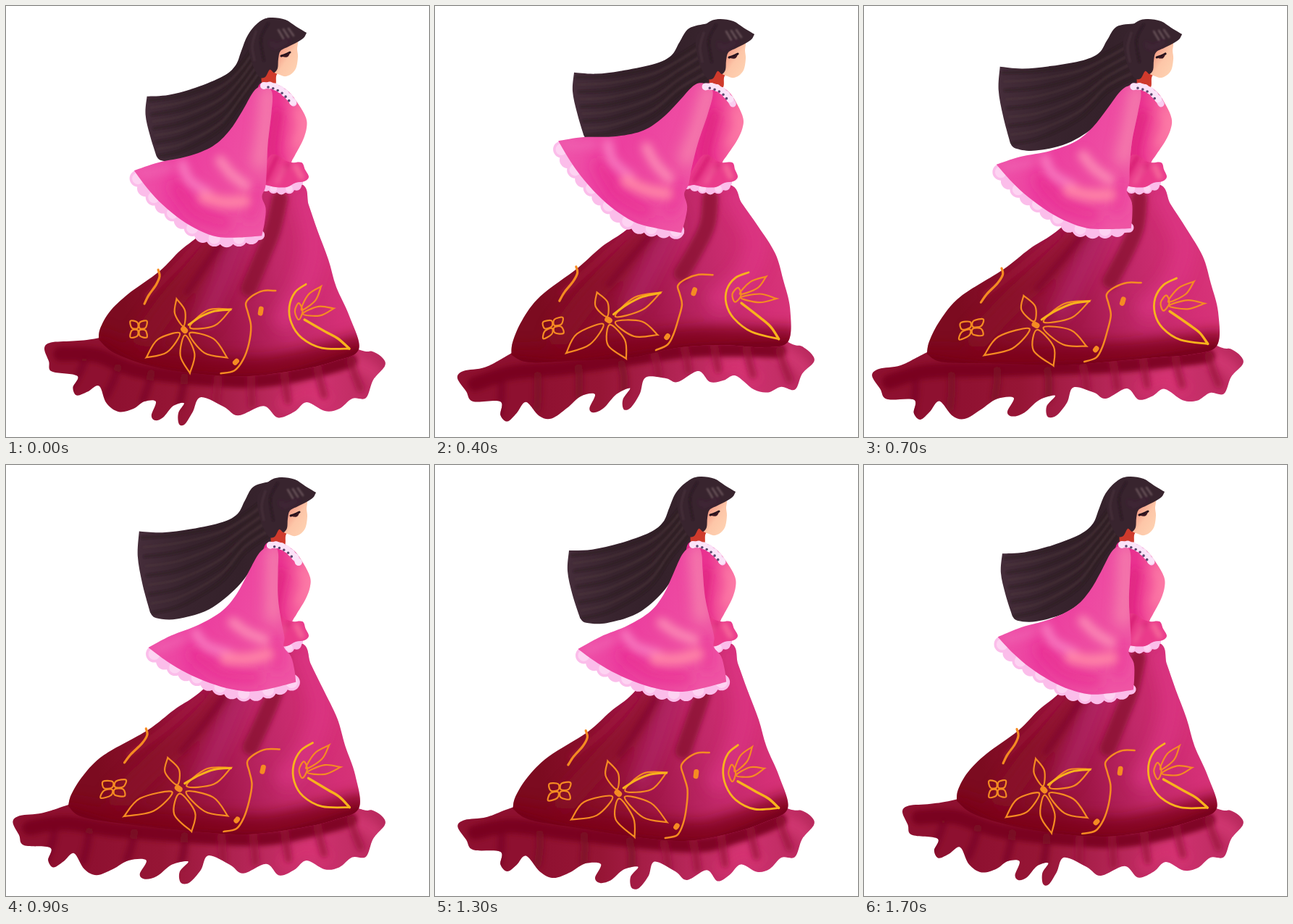
An HTML page for the animation above (1800 ms loop, 584 by 595 pixels).

```html
<!DOCTYPE html>
<html lang="en">
<head>
<meta charset="utf-8">
<title>Windswept dress</title>
<style>
html, body { margin: 0; width: 100%; height: 100%; overflow: hidden; background: #fff; }
svg { display: block; width: 584px; height: 595px; }
</style>
</head>
<body>
<svg id="stage" viewBox="0 0 584 595" xmlns="http://www.w3.org/2000/svg"></svg>
<script>
const LOOP = 1800, STEP = 100;
const unit = v => Math.max(0, Math.min(1, v));
const ease = v => (v = unit(v), v * v * (3 - 2 * v));

// Eases up from a to b and down from c to d, wrapping round the loop
function pulse(t, a, b, c, d) {
  const at = x => ease((x - a) / (b - a)) - ease((x - c) / (d - c));
  return at(t) + at(t + LOOP);
}
const windAt = t => ({
  sway: pulse(t, 0, 400, 600, 1200),
  lift: pulse(t, 0, 400, 450, 950),
  blow: pulse(t, 50, 500, 700, 1250),
  trail: pulse(t, 0, 800, 900, 1700),
  swing: pulse(t, 480, 950, 1520, 1840),
  settle: pulse(t, 900, 1300, 1400, 1840)
});

// Each part bends by a rule: (x, y, wind) gives the displacement
const head = (x, y, w) => [26 * w.sway, 2 * w.sway];

function torso(x, y, w) {
  const k = unit((235 - y) / 185) * w.sway;
  return [26 * k, 2 * k];
}
function hair(x, y, w) {
  const u = unit((350 - x) / 155), v = unit((y - 125) / 85);
  const top = -38 * w.blow - 7 * w.swing;
  const low = -22 * w.lift - 9 * w.blow + 5 * w.swing;
  return [
    26 * w.sway * (1 - u) ** 4 - u * (3 * w.sway + 10 * w.swing) + 20 * w.swing * v * u * (1 - u),
    2 * w.sway * (1 - u) + Math.sqrt(u) * (top + (low - top) * v)
  ];
}
function sleeve(x, y, w) {
  const r = unit((365 - x) / 190), q = unit((y - 120) / 200);
  return [
    torso(x, y, w)[0] * (1 - r) - 11 * w.lift * q + 52 * w.swing * q ** 1.4,
    -40 * w.lift * r ** .8 + w.swing * (40 * r - 22 * q)
  ];
}
function skirt(x, y, w) {
  const depth = unit((y - 255) / 220), edge = unit((y - 475) / 70);
  const bulge = Math.sin(Math.PI * depth) * Math.max(-.35, Math.min(1, (x - 300) / 150));
  const mid = Math.sin(Math.PI * unit((x - 130) / 350)) * depth;
  const billow = Math.exp(-(((x - 355) / 120) ** 2)) * (y - 255) / 310;
  return [
    26 * w.sway * bulge - 44 * w.trail * depth * unit((260 - x) / 90)
      + 28 * Math.min(1, w.sway + w.settle) * edge * unit((400 - x) / 150) + 13 * w.settle * mid,
    -50 * w.lift * billow + 42 * (w.sway + .65 * w.settle) * depth * unit((185 - x) / 100) + 8 * w.settle * mid
  ];
}

const svg = document.getElementById('stage');
const shapes = [];
function add(parent, tag, attrs = {}) {
  const el = document.createElementNS(svg.namespaceURI, tag);
  for (const k in attrs) el.setAttribute(k, attrs[k]);
  parent.appendChild(el);
  return el;
}
const defs = add(svg, 'defs');

// Colours spread evenly along the direction (x2, y2) of the shape's own box
function gradient(id, x2, y2, ...colors) {
  const g = add(defs, 'linearGradient', { id, x1: 0, y1: 0, x2, y2 });
  colors.forEach((c, i) => add(g, 'stop', { offset: i / (colors.length - 1), 'stop-color': c }));
}
for (const b of [1, 3, 6, 9]) {
  const f = add(defs, 'filter', { id: 'blur' + b, filterUnits: 'userSpaceOnUse', x: 0, y: 0, width: 584, height: 595 });
  add(f, 'feGaussianBlur', { stdDeviation: b });
}

// "x,y x,y! ..." where ! marks a sharp corner
function parse(text) {
  return text.trim().split(/\s+/).flatMap(s => {
    const p = s.replace('!', '').split(',').map(Number);
    return s.endsWith('!') ? [p, p] : [p];
  });
}
function shape(parent, bend, pts, attrs, closed = false) {
  if (typeof pts === 'string') pts = parse(pts);
  shapes.push({ el: add(parent, 'path', attrs), bend, pts, closed });
}
const fill = (parent, bend, pts, color) => shape(parent, bend, pts, { fill: color }, true);
const line = (parent, bend, pts, color, width, more) => shape(parent, bend, pts, {
  fill: 'none', stroke: color, 'stroke-width': width, 'stroke-linecap': 'round', 'stroke-linejoin': 'round', ...more
});

// Filled outline that returns a brush for soft strokes clipped to it
function body(id, bend, pts, color) {
  fill(add(defs, 'clipPath', { id }), bend, pts, '#000');
  fill(svg, bend, pts, color);
  const layer = add(svg, 'g', { 'clip-path': `url(#${id})` });
  return (blur, ...strokes) => {
    const g = add(layer, 'g', { filter: `url(#blur${blur})` });
    strokes.forEach(([p, c, w, opacity]) => line(g, bend, p, c, w, { opacity }));
  };
}
function lace(bend, pts, width, gap) {
  line(svg, bend, pts, '#fbbdea', width * .6);
  line(svg, bend, pts, '#fbbdea', width, { 'stroke-dasharray': `0 ${gap}` });
  line(svg, bend, pts, '#fdd3f2', width * .7, { 'stroke-dasharray': `0 ${gap * 2}` });
}

gradient('hairFill', 1, 0, '#452d3a', '#38242e', '#34212a', '#3a2630');
gradient('frillFill', 1, 0, '#8e1030', '#8e1030', '#961535', '#b02352', '#cf3270', '#b8295c');
gradient('skirtFill', 1, -.15, '#7c0b20', '#8a0f2c', '#a3174a', '#c02868', '#d42f76', '#dc3a7b');
gradient('torsoFill', 1, .1, '#e5268a', '#ea3390', '#fb74a4');
gradient('sleeveFill', 1, .3, '#f05cae', '#ec3f9f', '#ef55a4');
gradient('skin', .9, .8, '#d95548', '#f39a84', '#fdc6a8', '#fed0b0');

// Hair
const hairBrush = body('hairClip', hair,
  '195,125! 225,123 262,113 300,97 317,82 325,62 334,40 350,22 370,18 380,50 374,88 362,102 350,114 335,145 315,175 280,202 240,214 215,213 208,207! 199,178 193,150',
  'url(#hairFill)');
hairBrush(1, ...[...Array(9)].map((_, i) => {
  const u = i / 8;
  const pts = [[352, 40 + 55 * u], [325, 80 + 52 * u], [296, 104 + 66 * u], [245, 123 + 76 * u], [199 + 12 * u, 131 + 76 * u]];
  return i % 2 ? [pts, '#54403c', 2.5, .4] : [pts, '#241420', 5, .4];
}));

// Bottom frill with folds fanning out below the hem
const frillBrush = body('frillClip', skirt,
  '53,472 62,464 92,462 128,458 200,440 400,440 486,474 506,477 520,486 523,497 507,516 497,541 478,542 460,556 440,559 415,547 398,560 375,568 355,552 320,565 300,553 268,540 257,560 246,577 238,577 237,562 245,548 230,552 216,568 205,572 200,565 206,546 190,546 175,556 155,560 138,548 128,524 112,532 97,537 92,526 98,510 63,504 59,490',
  'url(#frillFill)');
const hemLine = '75,480 125,482 190,505 330,517 410,507 475,490';
frillBrush(6, ['470,490 500,500 512,512', '#d93f79', 20, .6], ['385,548 415,532 440,540', '#d93474', 18, .6]);
frillBrush(3, [hemLine, '#78051c', 20, .9], ...[...Array(9)].map((_, i) => {
  const x = 108 + 46 * i, y = 490 + 24 * Math.sin(Math.PI * i / 8), lean = (x - 330) * .09;
  return [[[x, y], [x + lean * .4, y + 18], [x + lean, y + 38]], i < 4 ? '#780a24' : '#98133c', 11, .65];
}));

// Skirt
const skirtBrush = body('skirtClip', skirt,
  '350,246 408,246 418,275 430,310 445,350 456,388 474,428 487,474 452,491 400,503 330,511 260,507 200,497 150,479 128,460! 130,445 143,422 168,398 212,366 240,338 265,318 300,285',
  'url(#skirtFill)');
skirtBrush(9,
  ['318,290 275,350 225,410 190,460', '#8a0d2b', 32, .7],
  ['325,310 300,375 275,430', '#b3246a', 28, .6],
  ['412,265 425,330 410,390 385,430', '#e2388b', 34, .5],
  ['130,472 200,497 330,508 400,500 487,478', '#7d0519', 48, .85]);
skirtBrush(3,
  ['378,266 368,310 352,350 335,390', '#86102f', 22, .75],
  ['300,322 270,365 250,395', '#7b0b28', 10, .5],
  ['272,320 235,360 195,400', '#a01a3c', 9, .5],
  ['131,468 200,502 330,514 400,505 486,478', '#74041a', 10, .8]);

// Embroidery
const ORANGE = '#f58b22', YELLOW = '#f8b31c';
const stitch = (pts, color = ORANGE, width = 2.5) => line(svg, skirt, pts, color, width);
function petal(cx, cy, degrees, size, spread, pointed) {
  const angle = degrees * Math.PI / 180;
  const at = (r, a) => [cx + size * r * Math.cos(angle + a), cy + size * r * Math.sin(angle + a)];
  const tip = at(1, 0);
  shape(svg, skirt, [at(.12, 0), at(.6, -spread), tip, ...(pointed ? [tip] : []), at(.6, spread)],
    { fill: 'none', stroke: ORANGE, 'stroke-width': 2.2 }, true);
}
stitch('210,364 212,373 207,385 197,399 191,411', ORANGE, 3.2);
for (let i = 0; i < 4; i++) petal(183, 446, 90 * i - 45, 16, .6);
for (const [angle, size] of [[144, 65], [83, 60], [33, 70], [-24, 70], [-104, 44]]) petal(246, 447, angle, size, .28, true);
stitch('252,440 268,429 288,421 310,419', YELLOW, 3);
stitch('245,446 247,448', ORANGE, 8);
stitch('372,393 355,393 340,400 331,410 334,424 338,442 335,466 327,488 315,503 296,507');
stitch('352,418 351,424', ORANGE, 7);
stitch('318,490 316,492', ORANGE, 7);
stitch('414,384 399,395 391,415 394,438 408,458 436,472 474,473', YELLOW, 2.8);
stitch('412,433 440,449 458,459 474,473', YELLOW, 3.4);
petal(404, 436, -90, 26, .35);
petal(404, 424, -50, 48, .22, true);
petal(404, 426, -10, 49, .22, true);

// Bodice and peplum
lace(torso, '348,246 362,250 375,253 388,253 399,249 406,244', 14, 11);
const torsoBrush = body('torsoClip', torso,
  '350,108 372,108 390,118 404,136 414,154 415,168 410,185 399,206 394,216 390,235 355,238 340,200 345,140',
  'url(#torsoFill)');
torsoBrush(6, ['374,150 368,200 378,220', '#dd1f7c', 16, .6], ['402,145 409,165 400,190', '#ff86a8', 9, .6]);
const peplumBrush = body('peplumClip', torso,
  '362,210 372,205 383,212 394,216 408,216 413,226 418,236 412,242 400,244 388,250 372,250 358,247 346,246',
  '#ea3b8b');
peplumBrush(3, ['374,208 358,242', '#d31a6d', 7, .8], ['390,218 380,232', '#c9186a', 5, .6],
  ['400,222 408,236', '#f76f9d', 8, .8], ['383,225 374,244', '#f4649c', 6, .7]);

// Sleeve
lace(sleeve, '181,237 194,254 208,268 222,280 240,295 262,311 278,319 298,322 320,321 338,318 348,317', 23, 17);
const sleeveBrush = body('sleeveClip', sleeve,
  '352,111 364,114 368,124 366,150 361,190 359,225 357,250 352,264 357,280 355,300 351,318! 320,320 290,319 265,310 240,295 215,274 195,252 176,226! 210,215 250,207 285,193 308,172 326,145 341,119',
  'url(#sleeveFill)');
sleeveBrush(9, ['362,120 358,170 350,215', '#f786b0', 22, .8],
  ['235,250 262,285 300,300', '#e7238c', 22, .5], ['345,255 335,290', '#ea2f93', 20, .5]);
sleeveBrush(6, ['243,218 252,240 278,258', '#f982c3', 13, .85], ['295,213 310,232 330,248', '#fc8db6', 14, .9],
  ['272,264 300,271 328,270', '#ff87a8', 17, .9], ['188,230 205,228 225,222', '#f26bb6', 10, .6]);

// Neck, collar, face and fringe
fill(svg, head, '356,80 376,86 373,97 371,111 354,110', '#cf3a2c');
const collar = '356,110 367,110 380,116 391,126 397,134';
line(svg, torso, collar, '#f9cdf0', 9);
line(svg, torso, collar, '#fbe3f8', 10, { 'stroke-dasharray': '0 8' });
line(svg, torso, '362,112 372,115 382,121 391,131', '#5a466e', 3.6, { 'stroke-dasharray': '0 7' });
fill(svg, head, '368,62 388,52 402,48 402,60 403,70 401,84 396,92 387,97 378,95 368,88', 'url(#skin)');
const headBrush = body('headClip', head,
  '334,44 342,30 354,19 368,16 386,19 400,28 415,37! 411,44 402,50 390,56 379,62 376,73 375,86 370,92 364,88 358,98 350,98 342,85 336,66',
  '#38242e');
headBrush(3, ['366,50 372,56 390,48', '#5a2450', 4, .4]);
headBrush(1, ...[0, 1, 2].map(i => [[[376 + 7 * i, 33 - i], [383 + 7 * i, 45 - 2 * i]], '#7c666b', 2.5, .7]),
  ['345,35 340,55 343,75', '#50383f', 3, .5], ['362,24 352,45 356,75', '#241420', 3, .6]);
line(svg, head, '380,69 386,67 392,64', '#24121c', 3);
line(svg, head, '384,69 388,69 390,66', '#3a1822', 3);

function curve(p, closed) {
  const n = p.length, r = v => v.toFixed(1);
  const at = i => closed ? p[(i + n) % n] : p[Math.max(0, Math.min(n - 1, i))];
  let d = `M${r(p[0][0])} ${r(p[0][1])}`;
  for (let i = 0; i < (closed ? n : n - 1); i++) {
    const [a, b, c, e] = [at(i - 1), at(i), at(i + 1), at(i + 2)];
    if (b[0] === c[0] && b[1] === c[1]) continue;
    const q = [0, 1].map(k => b[k] + (c[k] - a[k]) / 6), s = [0, 1].map(k => c[k] - (e[k] - b[k]) / 6);
    d += 'C' + [...q, ...s, ...c].map(r).join(' ');
  }
  return closed ? d + 'Z' : d;
}
function draw(t) {
  const wind = windAt(t);
  for (const { el, bend, pts, closed } of shapes) {
    const moved = pts.map(([x, y]) => {
      const [dx, dy] = bend(x, y, wind);
      return [x + dx, y + dy];
    });
    el.setAttribute('d', curve(moved, closed));
  }
}

let last = -1;
const start = performance.now();
function tick(now) {
  const t = Math.floor((Math.max(0, now - start) % LOOP) / STEP) * STEP;
  if (t !== last) draw(last = t);
  requestAnimationFrame(tick);
}
tick(start);
</script>
</body>
</html>
```
